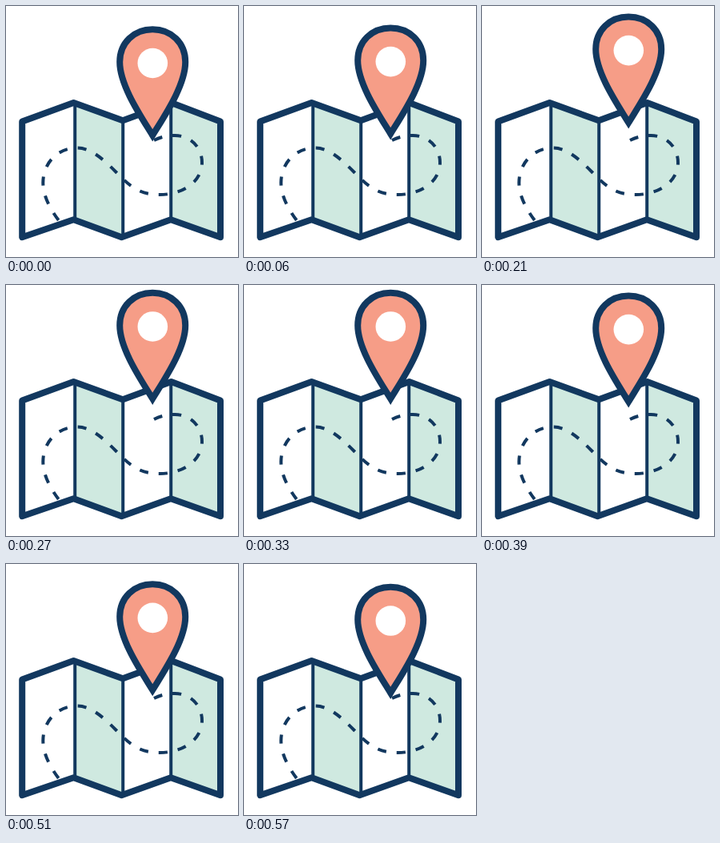
These frames come from a looping animation (290 by 314 pixels, 0.6 s). An HTML page:

```html
<!DOCTYPE html>
<html lang="en">
<head>
<meta charset="utf-8">
<title>Map pin</title>
<style>
  html, body { margin: 0; width: 100%; height: 100%; overflow: hidden; background: #fff; }
  svg { display: block; width: 290px; height: 314px; }
  .line { fill: none; stroke: #12385f; }
  .mint { fill: #cfe9e0; }
</style>
</head>
<body>
<svg viewBox="0 0 290 314">
  <path class="mint" d="M86 122L146.2 144V289L86 267.5ZM206.2 122L268 145V289L206.2 267.5Z"/>
  <path class="line" stroke-width="4" d="M86.2 122V267M146.2 144V288M206.2 122V267"/>
  <path class="line" stroke-width="8" stroke-linejoin="round"
    d="M20.2 144.5L84.5 121L146 143.3L206.5 121L268 144.5V289.2L206 267.3L144.5 289.2L84.5 267.3L20.2 289.2Z"/>
  <path class="line" stroke-width="4" pathLength="395" stroke-dasharray="11 13"
    d="M65.7 268C56 255 46.3 238 46.3 221C46.3 196 65 177.5 89 177.5C111 177.5 131 202 146 216C160 230 172 236 192 236C222 236 245 219 245 196C245 175 229 162 211 162C201 162 193 164 185 168"/>
  <g id="pin">
    <path class="line" style="fill:#f69d87" stroke-width="8"
      d="M183.2 161.8C169 138.5 142.2 99.5 142.2 70C142.2 46 160 29.3 183.2 29.3C206.4 29.3 224.2 46 224.2 70C224.2 99.5 197.4 138.5 183.2 161.8Z"/>
    <circle cx="183.3" cy="71.5" r="18.8" fill="#fff"/>
  </g>
</svg>
<script>
  const LOOP = 600, STEP = 30, LIFT = 10;
  const pin = document.getElementById('pin');

  function draw(now) {
    const t = Math.floor((now % LOOP) / STEP) * STEP;
    const y = -LIFT * (1 - Math.cos(2 * Math.PI * t / LOOP));
    pin.setAttribute('transform', `translate(0 ${y.toFixed(2)})`);
  }

  const start = performance.now();
  function tick() {
    draw(performance.now() - start);
    requestAnimationFrame(tick);
  }
  tick();
</script>
</body>
</html>
```
